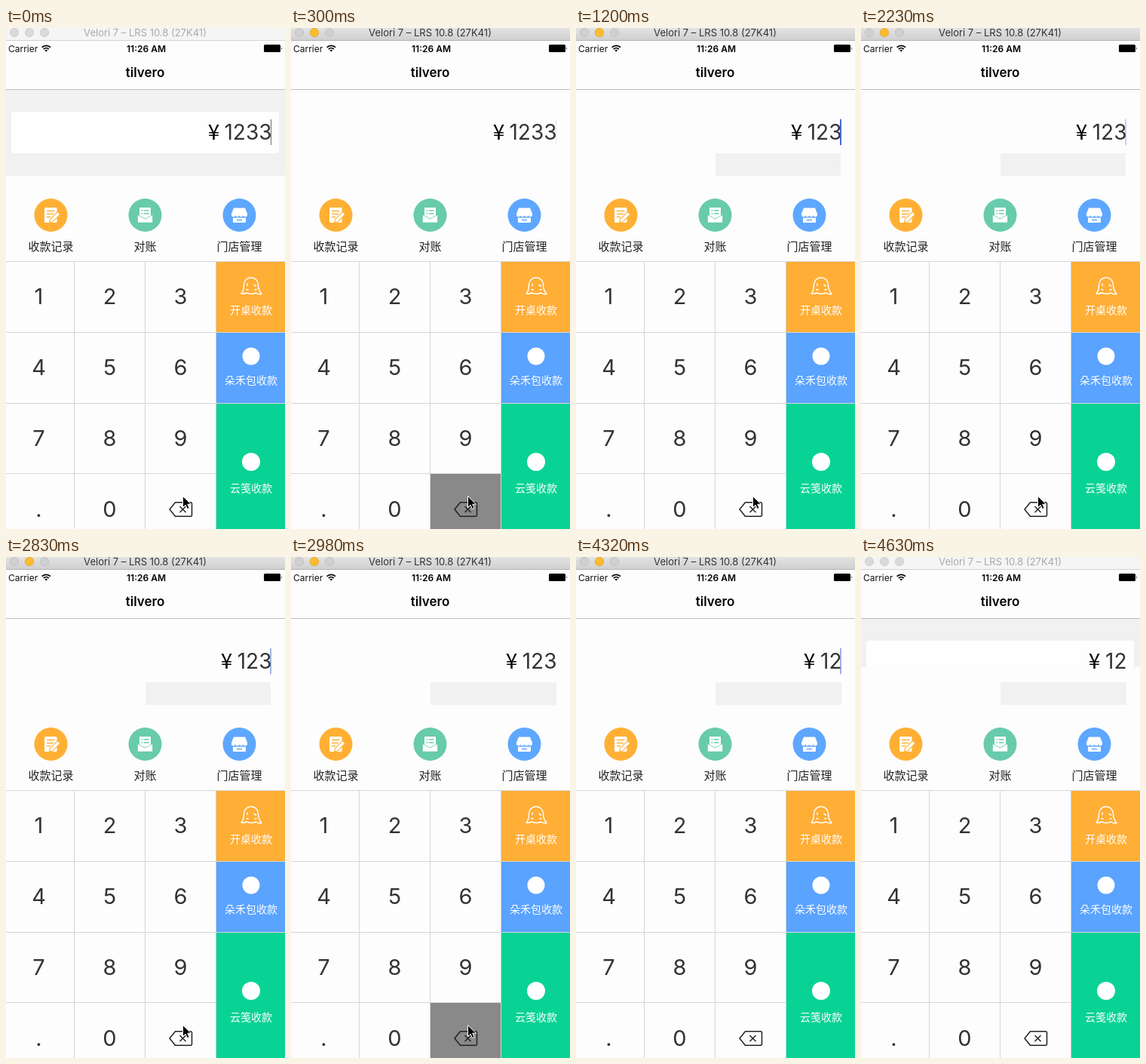
These frames come from a looping animation (370 by 664 pixels, 4.73 s). An HTML page:

```html
<!DOCTYPE html>
<html lang="zh">
<head>
<meta charset="utf-8">
<title>Keypad</title>
<style>
html, body { margin: 0; width: 100%; height: 100%; overflow: hidden; background: #fdfdfd; }
svg { display: block; width: 370px; height: 664px; font-family: Inter, "Noto Sans CJK SC", sans-serif; }
.mid { text-anchor: middle; }
.end { text-anchor: end; }
.cjk { font-family: "Noto Sans CJK SC", "Noto Sans CJK", sans-serif; text-anchor: middle; }
.menu { font-size: 15px; fill: #222; font-weight: 500; }
.pay { font-size: 14px; fill: #fff; }
.keys { font-size: 29px; fill: #333; text-anchor: middle; }
.sum { font-size: 28px; fill: #333; }
.yen { fill: #000; }

/* 4730 ms loop, every change is a hard step */
.t { animation: 4730ms step-end infinite; }
.idle { animation-name: idle; }
.live { animation-name: live; }
.field { animation-name: field; }
.fieldTop { animation-name: fieldTop; }
.strip { animation-name: strip; }
.edge { animation-name: edge; }
.four { animation-name: four; }
.three { animation-name: three; }
.two { animation-name: two; }
.press { animation-name: press; }
.dim { animation-name: dim; }
.caret { animation-name: caret; }
.arrow { animation-name: arrow; }

@keyframes idle { 0% { opacity: 1 } 6.3425% { opacity: 0 } 97.8858%, 100% { opacity: 1 } }
@keyframes live { 0% { opacity: 0 } 6.3425% { opacity: 1 } 97.8858%, 100% { opacity: 0 } }
@keyframes field { 0% { opacity: 1 } 6.3425%, 100% { opacity: 0 } }
@keyframes fieldTop { 0% { opacity: 0 } 97.8858%, 100% { opacity: 1 } }
@keyframes strip { 0% { opacity: 0 } 12.685%, 100% { opacity: 1 } }
@keyframes edge { 0% { opacity: 0 } 63.0021%, 100% { opacity: 1 } }
@keyframes four { 0% { opacity: 1 } 12.685%, 100% { opacity: 0 } }
@keyframes three { 0% { opacity: 0 } 12.685% { opacity: 1 } 66.1734%, 100% { opacity: 0 } }
@keyframes two { 0% { opacity: 0 } 66.1734%, 100% { opacity: 1 } }
@keyframes press {
  0% { opacity: 0 } 6.3425% { opacity: 1 } 12.685% { opacity: 0 }
  63.0021% { opacity: 1 } 66.1734%, 100% { opacity: 0 }
}
@keyframes dim { 0% { opacity: 1 } 6.3425% { opacity: .18 } 9.5137%, 100% { opacity: 0 } }
/* caret waits at the old text end after a deletion, then blinks at the new one */
@keyframes caret {
  0% { opacity: 0; transform: none }
  12.685% { opacity: 1; transform: translateX(-15px) }
  25.37% { opacity: 1; transform: none }
  38.055% { opacity: .5; transform: none }
  41.0148% { opacity: 0; transform: none }
  47.1459% { opacity: .3; transform: none }
  50.3171% { opacity: 1; transform: none }
  59.8309% { opacity: .5; transform: none }
  63.0021% { opacity: 0; transform: none }
  66.1734% { opacity: 1; transform: translateX(-15px) }
  78.8584% { opacity: 1; transform: none }
  91.3319% { opacity: .5; transform: none }
  94.5032%, 100% { opacity: 0; transform: none }
}
@keyframes arrow {
  0% { opacity: 1; transform: none }
  84.9894% { opacity: 1; transform: translate(13px, 14px) }
  88.1607%, 100% { opacity: 0; transform: none }
}
</style>
</head>
<body>
<svg viewBox="0 0 370 664">
  <defs>
    <linearGradient id="bar" x2="0" y2="1">
      <stop stop-color="#e3e3e3"/><stop offset="1" stop-color="#d0d0d0"/>
    </linearGradient>
  </defs>
  <rect width="370" height="664" fill="#fdfdfd"/>

  <!-- window bar -->
  <g class="t idle">
    <rect width="370" height="16" fill="#f5f5f5"/>
    <rect y="16" width="370" height="1" fill="#d2d2d2"/>
    <g fill="#d9d9d9" stroke="#cbcbcb" stroke-width=".8">
      <circle cx="11" cy="6" r="5.7"/><circle cx="31" cy="6" r="5.7"/><circle cx="51" cy="6" r="5.7"/>
    </g>
    <text class="mid" x="184.5" y="11" font-size="13" fill="#a9a9a9">Velori 7 – LRS 10.8 (27K41)</text>
  </g>
  <g class="t live">
    <rect width="370" height="16" fill="url(#bar)"/>
    <rect y="16" width="370" height="1" fill="#b3b3b3"/>
    <g fill="#d0d0d0" stroke="#bebebe" stroke-width=".8">
      <circle cx="11" cy="6" r="5.7"/><circle cx="51" cy="6" r="5.7"/>
      <circle cx="31" cy="6" r="5.7" fill="#fdbc2f" stroke="#e0a22c"/>
    </g>
    <text class="mid" x="184.5" y="11" font-size="13" fill="#333">Velori 7 – LRS 10.8 (27K41)</text>
  </g>

  <!-- status and navigation -->
  <text x="3" y="31.5" font-size="12" fill="#111">Carrier</text>
  <g fill="none" stroke="#000" stroke-width="1.8">
    <path d="M47.6 25.6a8.2 8.2 0 0 1 11.4 0M49.9 28a5 5 0 0 1 6.8 0"/>
    <path d="M53.3 31.6l-1.9-2a2.8 2.8 0 0 1 3.8 0z" fill="#000" stroke="none"/>
  </g>
  <text class="mid" x="186" y="31.5" font-size="12" font-weight="600">11:26 AM</text>
  <rect x="342" y="22" width="22" height="10" rx="1.5"/>
  <path d="M365 25.3q1.8 1.7 0 3.4z"/>
  <text class="mid" x="184.5" y="65" font-size="17" font-weight="600">tilvero</text>
  <rect y="81" width="370" height="1" fill="#bdbdbd"/>

  <!-- amount field -->
  <g class="t field">
    <rect y="82" width="370" height="114" fill="#f1f1f1"/>
    <rect x="7" y="111" width="355" height="55" rx="4" fill="#fefefe"/>
  </g>
  <g class="t fieldTop">
    <rect y="82" width="370" height="64" fill="#f1f1f1"/>
    <path d="M7 146V115a4 4 0 0 1 4-4H358a4 4 0 0 1 4 4V146z" fill="#fefefe"/>
  </g>
  <rect class="t strip" x="185" y="166" width="166" height="30" fill="#f1f1f1"/>
  <rect class="t edge" x="351" y="166" width="1" height="30" fill="#f1f1f1"/>
  <g class="sum">
    <g class="t four"><text class="cjk yen" x="275.5" y="148">¥</text><text class="end" x="352.5" y="148">1233</text></g>
    <g class="t three"><text class="cjk yen" x="292.5" y="148">¥</text><text class="end" x="352.5" y="148">123</text></g>
    <g class="t two"><text class="cjk yen" x="309.5" y="148">¥</text><text class="end" x="352.5" y="148">12</text></g>
  </g>
  <rect class="t dim" x="351" y="121" width="1" height="34" fill="#6e6e6e"/>
  <rect class="t caret" x="350" y="120.5" width="2" height="35" rx="1" fill="#4169d8"/>

  <!-- menu -->
  <circle cx="59.5" cy="248" r="22" fill="#ffb034"/>
  <rect x="51" y="238" width="16.5" height="20" rx="1.5" fill="#fff"/>
  <path d="M54 242.5h10.5M54 246.5h9M54 250.5h5" stroke="#ffb034" stroke-width="1.3"/>
  <path d="M57.5 258l1.2-4.600 9.800-9.800 3.400 3.400-9.800 9.800z" fill="#fff" stroke="#ffb034" stroke-width="1.1"/>

  <circle cx="184.5" cy="248" r="22" fill="#68cbab"/>
  <path d="M177 238h15v11l-7.5 3.5-7.5-3.5z" fill="#fff"/>
  <path d="M179.5 242h2M183 242h6.5M179.5 246h2M183 246h6.5" stroke="#68cbab" stroke-width="1.5"/>
  <path d="M174.5 247.5l10 5.5 10-5.5V257a1 1 0 0 1-1 1h-18a1 1 0 0 1-1-1z" fill="#fff" stroke="#68cbab" stroke-width=".7"/>

  <circle cx="309.5" cy="248" r="22" fill="#5ea7ff"/>
  <path d="M302 238.5h15l3 7.5v1.5a2.6 2.6 0 0 1-5.25 0 2.6 2.6 0 0 1-5.25 0 2.6 2.6 0 0 1-5.25 0 2.6 2.6 0 0 1-5.25 0V246z" fill="#fff"/>
  <path d="M301 251.5h17V257a1 1 0 0 1-1 1h-15a1 1 0 0 1-1-1z" fill="#fff"/>
  <path d="M306 254.5h7" stroke="#5ea7ff" stroke-width="1.5"/>

  <g class="cjk menu">
    <text x="59.5" y="295">收款记录</text>
    <text x="184.5" y="295">对账</text>
    <text x="309.5" y="295">门店管理</text>
  </g>

  <!-- payment buttons -->
  <rect x="278" y="309" width="92" height="95" fill="#ffae36"/>
  <rect x="278" y="404" width="92" height="94" fill="#5aa3fe"/>
  <rect x="278" y="498" width="92" height="166" fill="#08d394"/>
  <g fill="none" stroke="#fff" stroke-width="1.5" stroke-linecap="round" stroke-linejoin="round">
    <path d="M312 352c3-3 3.500-7 3.500-11.500a9.500 9.800 0 0 1 19 0c0 4.500 1 8 4.500 12-3 .500-5.500 0-7.500-1.500-4 1.800-8.500 1.800-12.500 0-2 1.200-4.500 1.500-7 1z"/>
    <path d="M320 339v2.500M329 340.500l2.500 1.500M319 346.500l2 .500M330 347l2-.500"/>
  </g>
  <circle cx="325" cy="435" r="11.5" fill="#fff"/>
  <circle cx="325" cy="575" r="12" fill="#fff"/>
  <g class="cjk pay">
    <text x="325" y="379">开桌收款</text>
    <text x="325" y="472">朵禾包收款</text>
    <text x="325" y="614.5">云笺收款</text>
  </g>

  <!-- keypad -->
  <path d="M0 309.5H370M0 403.5H370M0 497.5H370M0 590.5H278M90.5 309V664M184.5 309V664M278.5 309V664" fill="none" stroke="#d6d6d6"/>
  <rect class="t press" x="185" y="591" width="93" height="73" fill="#898989"/>
  <g class="keys">
    <text x="43.5" y="366">1</text><text x="137.5" y="366">2</text><text x="231.5" y="366">3</text>
    <text x="43.5" y="460">4</text><text x="137.5" y="460">5</text><text x="231.5" y="460">6</text>
    <text x="43.5" y="554">7</text><text x="137.5" y="554">8</text><text x="231.5" y="554">9</text>
    <text x="43.5" y="648">.</text><text x="137.5" y="648">0</text>
  </g>
  <g fill="none" stroke="#222" stroke-width="1.5" stroke-linejoin="round">
    <path d="M217 638l7.5-9.25H245a1.5 1.5 0 0 1 1.5 1.5V645.75a1.5 1.5 0 0 1-1.5 1.5H224.5z"/>
    <path d="M230.5 634l8 8m0-8l-8 8"/>
  </g>

  <!-- pointer -->
  <path class="t arrow" d="M234.5 620.5v15l3.600-3.300 2.400 5.300 2.600-1.100-2.400-5.200h4.900z" fill="#000" stroke="#fff" stroke-linejoin="round"/>
</svg>
</body>
</html>
```
